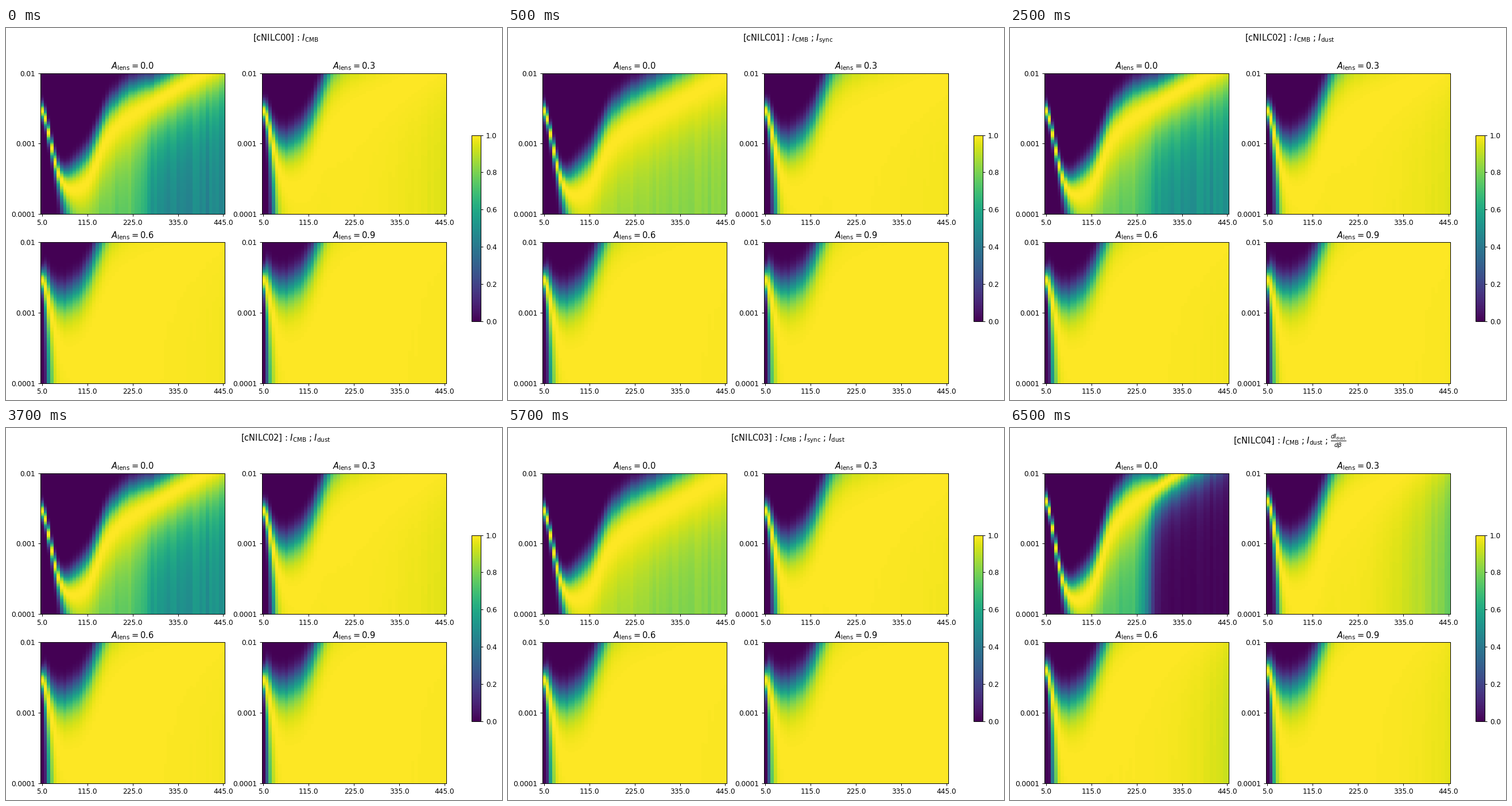
A matplotlib script that plays this animation: 864x648 px, repeating every 8 s.

```python
import numpy as np
import matplotlib.pyplot as plt
from matplotlib.animation import FuncAnimation

W, H, DPI = 864, 648, 87.7
LEFT, TOP = 60, 78.6
COLUMNS, ROWS = 57, 100
LENSING = (0.0, 0.3, 0.6, 0.9)
STEP_MS, STEPS = 500, 16

CMB, SYNC, DUST = (r"$I_{\mathrm{%s}}$" % s for s in ("CMB", "sync", "dust"))
SLOPE = r"$\frac{dI_{\mathrm{dust}}}{d\beta}$"

# Components, then the ridge (log10 of start, valley, shelf; slope after the
# shelf) and its relative width on the shelf and at the far right.
CASES = [
    ([CMB], (-2.54, -3.70, -2.75, 0.027), (1.3, 0.82)),
    ([CMB, SYNC], (-2.54, -3.78, -2.90, 0.025), (1.7, 1.6)),
    ([CMB, DUST], (-2.54, -3.78, -2.77, 0.027), (1.3, 0.87)),
    ([CMB, SYNC, DUST], (-2.54, -3.84, -2.92, 0.026), (1.8, 1.55)),
    ([CMB, DUST, SLOPE], (-2.40, -3.86, -2.60, 0.032), (1.2, 0.36)),
]

column = np.arange(COLUMNS)
ratio = 10 ** np.linspace(-2, -4, ROWS)[:, None]
jitter = np.random.default_rng(4).uniform(-1, 1, COLUMNS)


def rise(center, width):
    """Smooth step from 0 to 1 across the columns."""
    return 1 / (1 + np.exp((center - column) / width))


# Extra width per unit of lensing, and the width of one column in log ratio.
lens_width = (0.0015 * (1 - np.exp(-(column + 0.2) / 0.8))
              * 10 ** (1.62 * rise(17.5, 3) + 0.0075 * np.maximum(column - 26, 0))
              * (1 + 0.06 * jitter))
log_width = 0.17 / np.sqrt(1 + column / 3)


def likelihood(case, lensing):
    """Likelihood of each ratio, peaking at a different value in each column."""
    _, (start, valley, shelf, slope), (middle, end) = CASES[case]
    drop = 1 - np.exp(-(column / 4) ** 1.7)
    peak = 10 ** (start + (valley - start) * drop + (shelf - valley) * rise(17.3, 2)
                  + slope * np.maximum(column - 22, 0))
    relative = 0.17 + (middle - 0.17) * rise(9, 2) + (end - middle) * rise(31, 1.5)
    sigma = peak * relative * (1 + 0.06 * jitter * rise(17, 1)) + lensing * lens_width
    noise = np.maximum(sigma / log_width - peak, 0)
    z = np.log((ratio + noise) / (peak + noise)) / log_width
    return np.exp(-z ** 2 / 2)


# The layout is a 13 x 8 inch page with default margins, cropped to the stage.
page_w, page_h = 13 * DPI, 8 * DPI
fig = plt.figure(figsize=((W + 1e-6) / DPI, (H + 1e-6) / DPI), dpi=DPI)
axes = fig.subplots(2, 2, gridspec_kw=dict(
    left=LEFT / W, right=(LEFT + 0.775 * page_w) / W,
    top=1 - TOP / H, bottom=1 - (TOP + 0.77 * page_h) / H,
    wspace=0.2, hspace=0.2))

images = []
for ax, lensing in zip(axes.flat, LENSING):
    images.append(ax.imshow(likelihood(0, lensing), vmin=0, vmax=1, cmap="viridis",
                            aspect="auto", interpolation="nearest",
                            extent=(0, COLUMNS, -4, -2)))
    ax.set_xticks(0.5 + 14 * np.arange(5), [f"{5 + 110 * n:.1f}" for n in range(5)])
    ax.set_yticks([-2, -3, -4], ["0.01", "0.001", "0.0001"])
    ax.set_title(rf"$A_{{\mathrm{{lens}}}} = {lensing}$")

fig.colorbar(images[0], ax=list(axes.flat), shrink=0.6)
heading = fig.text((LEFT + 0.375 * page_w) / W, 1 - (TOP - 0.1 * page_h) / H, "",
                   fontsize=12, ha="center", va="top")


def update(step):
    case = (step + 3) // 4
    heading.set_text(f"[cNILC{case:02d}] : " + " ; ".join(CASES[case][0]))
    for image, lensing in zip(images, LENSING):
        image.set_data(likelihood(case, lensing))
    return [heading, *images]


animation = FuncAnimation(fig, update, frames=STEPS, interval=STEP_MS,
                          repeat=True, repeat_delay=0, blit=False)
plt.show()
```
